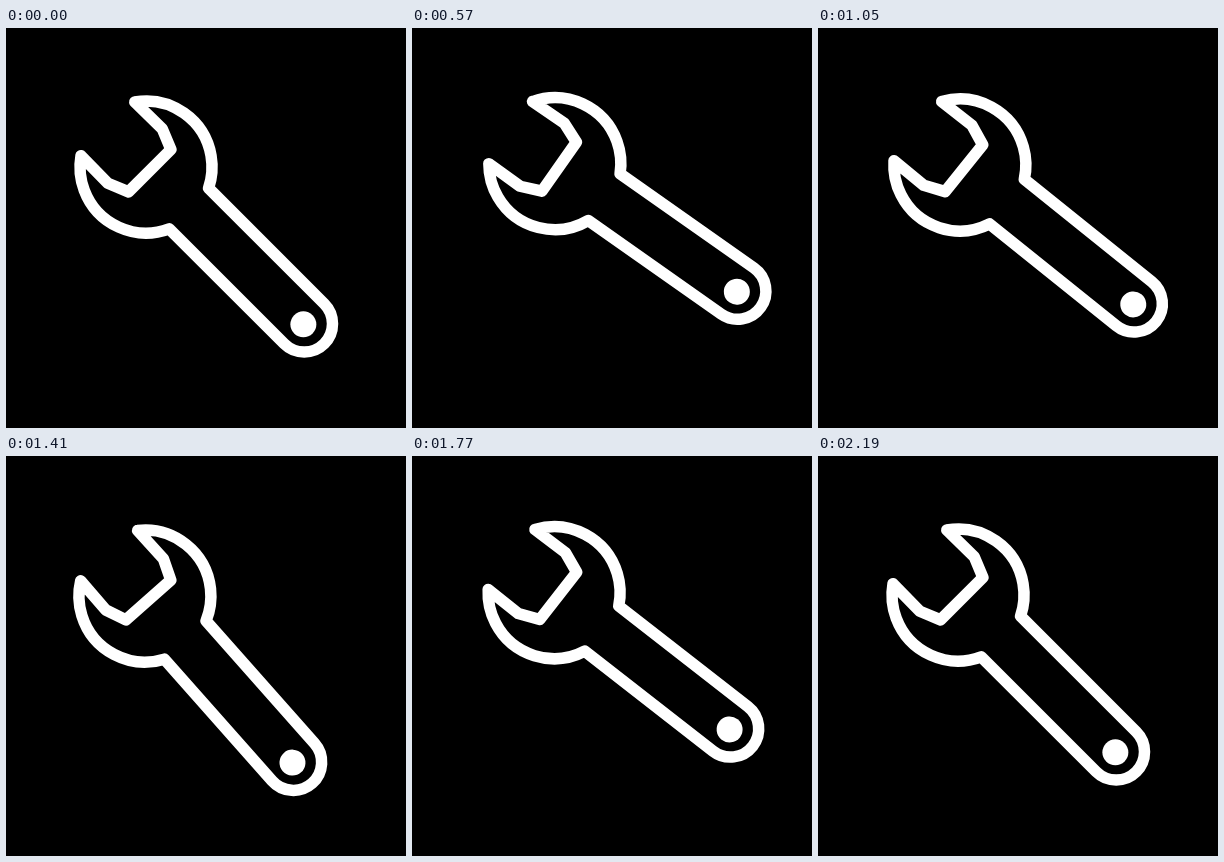
Recreate the animation shown at these times as an HTML page with a canvas. Size 400 by 400 pixels, loop 2250 ms.

```html
<!DOCTYPE html>
<html lang="en">
<head>
<meta charset="utf-8">
<title>Wrench</title>
<style>
html, body { margin: 0; width: 100%; height: 100%; overflow: hidden; background: #000; }
canvas { display: block; width: 100vmin; height: 100vmin; }
</style>
</head>
<body>
<canvas id="stage" width="400" height="400"></canvas>
<script>
const ctx = document.getElementById('stage').getContext('2d');
const LOOP = 2250, STEP = 30, END = 2190;
const PIVOT = { x: 122, y: 121 };
const HEAD = { x: 25.5, r: 66 };
const HOLE = { x: 248, r: 13 };
const GRIP = { x: 248.2, y: -1, r: 28.3 };

// Cubic easing with control points (x1, 0) and (x2, 1)
const bezier = (x1, x2) => u => {
  let lo = 0, hi = 1;
  for (let i = 0; i < 24; i++) {
    const s = (lo + hi) / 2, q = 1 - s;
    const x = 3 * q * q * s * x1 + 3 * q * s * s * x2 + s * s * s;
    if (x < u) lo = s; else hi = s;
  }
  return lo * lo * (3 - 2 * lo);
};
const lift = bezier(0.6, 0.6);
const pull = bezier(0.25, 0);

// Time in ms, angle in degrees, easing towards this key
const KEYS = [
  [0, 45],
  [170, 67, lift],
  [550, 35, pull],
  [862, 67, lift],
  [1230, 35, pull],
  [1567, 67, lift],
  [1930, 35, pull],
  [END, 45, lift]
];

function angleAt(t) {
  const i = KEYS.findIndex((k, n) => n > 0 && t <= k[0]);
  const [t0, a0] = KEYS[i - 1];
  const [t1, a1, ease] = KEYS[i];
  return a0 + (a1 - a0) * ease((t - t0) / (t1 - t0));
}

// Outline along the x axis, with the jaw opening around the pivot
function buildWrench() {
  const p = new Path2D();
  const tip = Math.atan2(38, -54);
  const joinAt = y => Math.asin(y / HEAD.r);
  p.moveTo(-28.5, 38);
  p.lineTo(10, 38.5);
  p.lineTo(30.7, 30);
  p.lineTo(30.7, -30);
  p.lineTo(10, -38.5);
  p.lineTo(-28.5, -38);
  p.arc(HEAD.x, 0, HEAD.r, -tip, joinAt(GRIP.y - GRIP.r));
  p.arc(GRIP.x, GRIP.y, GRIP.r, -Math.PI / 2, Math.PI / 2);
  p.arc(HEAD.x, 0, HEAD.r, joinAt(GRIP.y + GRIP.r), tip);
  p.closePath();
  return p;
}
const wrench = buildWrench();

function draw(t) {
  ctx.setTransform(1, 0, 0, 1, 0, 0);
  ctx.fillStyle = '#000';
  ctx.fillRect(0, 0, 400, 400);
  ctx.translate(PIVOT.x, PIVOT.y);
  ctx.rotate(angleAt(t) * Math.PI / 180);
  ctx.strokeStyle = ctx.fillStyle = '#fff';
  ctx.lineWidth = 11.5;
  ctx.lineJoin = 'round';
  ctx.stroke(wrench);
  ctx.beginPath();
  ctx.arc(HOLE.x, 0, HOLE.r, 0, Math.PI * 2);
  ctx.fill();
}

const start = performance.now();
function tick() {
  const t = (performance.now() - start) % LOOP;
  draw(Math.min(Math.floor(t / STEP) * STEP, END));
  requestAnimationFrame(tick);
}
tick();
</script>
</body>
</html>
```
